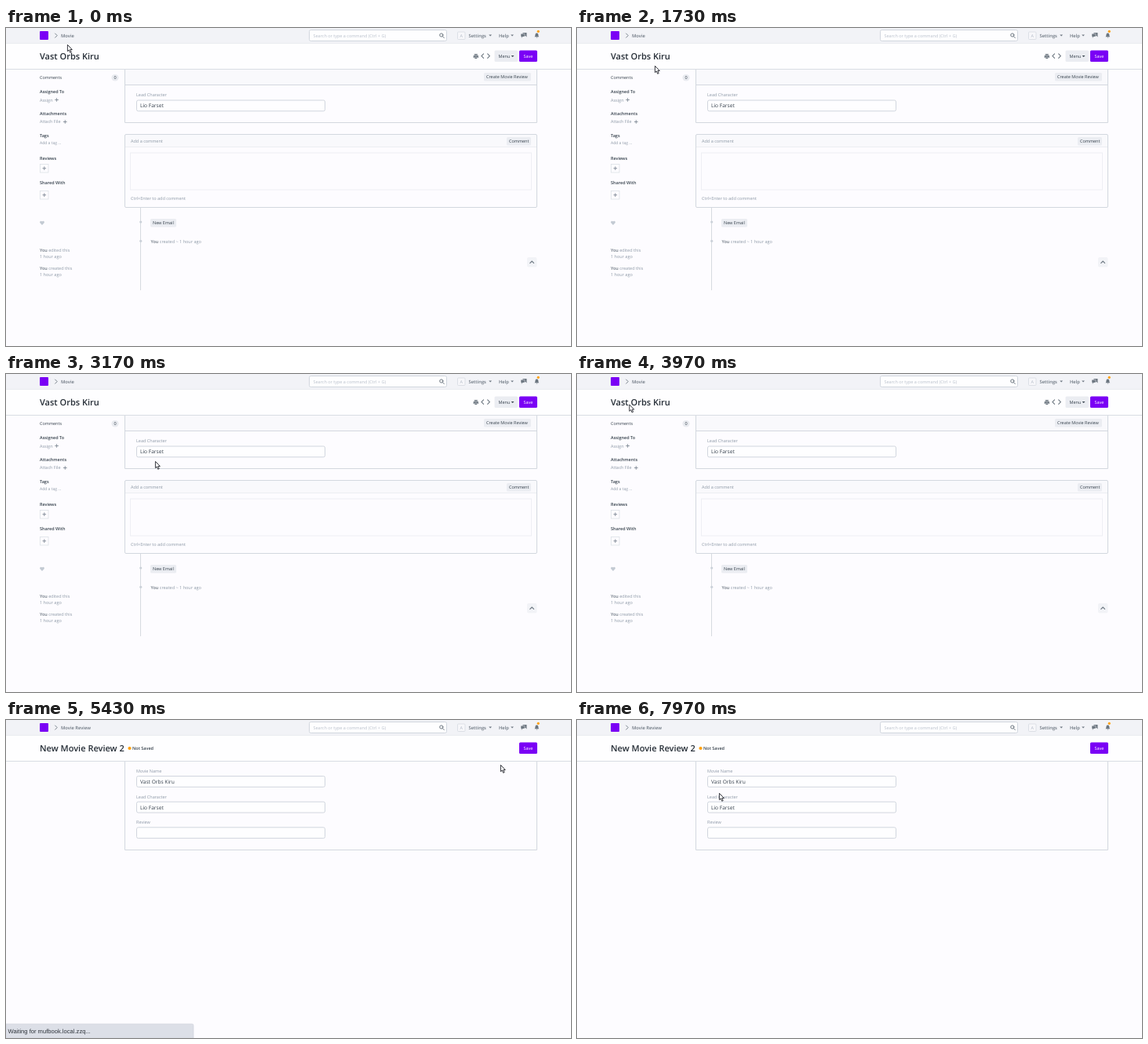
An HTML page for the animation above (8 s loop, 720 by 405 pixels).

```html
<!DOCTYPE html>
<html lang="en">
<head>
<meta charset="utf-8">
<title>Movie review form</title>
<style>
html, body { margin: 0; width: 100%; height: 100%; overflow: hidden; background: #fdfcff; }
svg { display: block; width: 720px; height: 405px; }
text { font: 5.5px "Open Sans", "Noto Sans", sans-serif; fill: #36414c; text-rendering: geometricPrecision; white-space: pre; }
.m { fill: #8d99a6; }
.b { font-weight: 600; }
.n { font-weight: 600; font-size: 5.8px; fill: #6c7680; }
.t { font-weight: 600; font-size: 11px; fill: #252d36; }
.v { font-size: 6.6px; }
.k { font-weight: 500; }
.btn { fill: #ebedf2; }
.box { fill: none; stroke: #d3d8df; }
.in { fill: #fefeff; stroke: #d1d6de; }
.ln { fill: none; stroke: #6c7680; stroke-linecap: round; stroke-linejoin: round; }
.ic { fill: #6c7680; }
</style>
</head>
<body>
<svg viewBox="0 0 720 405">
  <defs>
    <path id="plus" d="M-2.3 0h4.6M0-2.3v4.6" stroke="#7f8a96" stroke-width=".9"/>
    <path id="caret" d="M-1.9-1h3.8L0 1z"/>
    <rect id="field" class="in" x="166.5" width="240" height="13.8" rx="2"/>
    <rect id="add" x="43.5" width="10.5" height="10.5" fill="none" stroke="#dde1e7" stroke-width=".8"/>
  </defs>
  <rect width="720" height="405" fill="#fdfcff"/>

  <g id="record">
    <path fill="#f9f9fc" d="M152 52h524v20H152z"/>
    <path class="box" d="M151.5 52V120.5H676.5V52M152 72.5H676"/>
    <rect id="create" class="btn" x="609" y="57" width="60" height="10.5" rx="1.5"/>
    <text class="k" x="612" y="64.2">Create Movie Review</text>
    <text class="m" x="166" y="87">Lead Character</text>
    <use href="#field" y="92"/>
    <text class="v" x="171" y="101.2">Lio Farset</text>

    <path fill="#f9f9fc" d="M152 136h524v15H152z"/>
    <path stroke="#eceef2" d="M152 151.5H676"/>
    <rect class="box" x="151.5" y="135.5" width="525" height="93" rx="1.5"/>
    <text class="m" x="159" y="145.6">Add a comment</text>
    <rect class="btn" x="638" y="139" width="31" height="10.5" rx="1.5"/>
    <text class="k" x="641" y="146.1">Comment</text>
    <rect x="158.5" y="159" width="511" height="47" fill="none" stroke="#eeeff4"/>
    <text class="m" x="159" y="218.8">Ctrl+Enter to add comment</text>

    <path stroke="#d6dae0" d="M171.5 229V334"/>
    <circle cx="171.7" cy="247" r="1.6" fill="#cbd1d9"/>
    <circle cx="171.7" cy="271.3" r="1.6" fill="#cbd1d9"/>
    <rect class="btn" x="184" y="243" width="33" height="10.5" rx="1.5"/>
    <text class="k" x="187" y="250.4">New Email</text>
    <text class="m" x="184.5" y="273.7"><tspan class="b" fill="#6c7680">You</tspan> created ~ 1 hour ago</text>
    <rect x="664" y="292" width="12.5" height="12.5" rx="2" fill="#f2f3f7"/>
    <path class="ln" d="M667.8 299.4l2.4-2.4 2.4 2.4" stroke-width="1.1"/>

    <text x="43" y="65.2">Comments</text>
    <rect x="134.5" y="59" width="9" height="8.5" rx="4.2" fill="#e9ebf0"/>
    <text x="137.5" y="65.2">0</text>
    <text class="b" x="43" y="82.6">Assigned To</text>
    <text class="m" x="43" y="93.5">Assign</text>
    <text class="b" x="43" y="110.6">Attachments</text>
    <text class="m" x="43" y="121.3">Attach File</text>
    <text class="b" x="43" y="138.6">Tags</text>
    <text class="m" x="43" y="148.3" style="font-size:5px">Add a tag ...</text>
    <text class="b" x="43" y="167.7">Reviews</text>
    <text class="b" x="43" y="199.3">Shared With</text>
    <use href="#add" y="173.5"/>
    <use href="#add" y="207.5"/>
    <use href="#plus" x="64.6" y="91.5"/>
    <use href="#plus" x="75.3" y="119.5"/>
    <use href="#plus" x="48.8" y="178.7"/>
    <use href="#plus" x="48.8" y="212.7"/>
    <path fill="#c3cad3" d="M46 251l-2.6-2.7c-1.1-1.5.9-3.8 2.6-1.9 1.7-1.9 3.7.4 2.6 1.9z"/>
    <text class="m" x="43" y="284.7"><tspan class="b" fill="#6c7680">You</tspan> edited this</text>
    <text class="m" x="43" y="292.8">1 hour ago</text>
    <text class="m" x="43" y="307.7"><tspan class="b" fill="#6c7680">You</tspan> created this</text>
    <text class="m" x="43" y="315.7">1 hour ago</text>
  </g>

  <g id="review">
    <path class="box" d="M151.5 52V165.5H676.5V52"/>
    <text class="m" x="166" y="67">Movie Name</text>
    <text class="m" x="166" y="99.6">Lead Character</text>
    <text class="m" x="166" y="132.3">Review</text>
    <use href="#field" y="71.5"/>
    <use href="#field" y="104.2"/>
    <use href="#field" y="136.8"/>
    <text class="v" x="171" y="80.9">Vast Orbs Kiru</text>
    <text class="v" x="171" y="113.5">Lio Farset</text>
  </g>

  <path fill="#fefeff" d="M0 20h720v32H0z"/>
  <path stroke="#d9dde3" d="M0 52.5H720"/>
  <path fill="#f2f3f7" d="M0 0h720v20H0z"/>
  <path stroke="#eaecf0" d="M0 19.5H720"/>
  <rect x="43" y="4" width="11" height="11" rx="1" fill="#7a00f5"/>
  <path class="ln" d="M62.6 7l2.6 2.6-2.6 2.6" stroke-width=".9"/>
  <rect class="in" x="386.5" y="2.5" width="175" height="14" rx="2"/>
  <text x="391.5" y="11.6" style="fill:#b9c0ca">Search or type a command (Ctrl + G)</text>
  <g class="ln"><circle cx="554.8" cy="9" r="2.1"/><path d="M556.4 10.7l1.9 1.9"/></g>
  <rect x="575.5" y="5" width="9.5" height="9.5" rx="1" fill="#f7f7fa" stroke="#d6dae1" stroke-width=".8"/>
  <text x="578.5" y="11.9" style="fill:#b4bcc7">A</text>
  <text class="n" x="589.5" y="11.7">Settings</text>
  <text class="n" x="628" y="11.7">Help</text>
  <use class="ic" href="#caret" x="617.2" y="9.6"/>
  <use class="ic" href="#caret" x="645.1" y="9.6"/>
  <path class="ic" d="M658.5 6h5v5.5l-1.5-1.5h-3.5z"/>
  <path class="ic" stroke="#f2f3f7" stroke-width=".5" d="M656 7.3h5v3.8h-2.5l-1.7 1.8v-1.8h-.8z"/>
  <path class="ic" d="M673.5 11.3c1-1 .9-2 1-3 .2-2.3 3.6-2.3 3.8 0 .1 1 0 2 1 3zM675.6 11.7h1.8c-.2 1-1.6 1-1.8 0z"/>
  <circle cx="678.3" cy="4.3" r="1.6" fill="#ffa00a"/>

  <g id="recordHead">
    <text class="n" x="70" y="11.7">Movie</text>
    <text class="t" x="43" y="39.9">Vast Orbs Kiru</text>
    <path class="ic" d="M596.8 33h4v1.6h-4zM595.7 35h6.2v3h-1.1v-1.2h-4v1.2h-1.1zM597.3 37.3h3v1.8h-3z"/>
    <path class="ln" d="M608.6 32.9l-2.7 2.7 2.7 2.7M613.7 32.9l2.7 2.7-2.7 2.7" stroke-width="1.1"/>
    <rect class="btn" x="622.5" y="28.5" width="29.5" height="14.5" rx="1.5"/>
    <text class="k" x="627.5" y="37.9">Menu</text>
    <use href="#caret" x="645.6" y="36" fill="#36414c"/>
  </g>
  <g id="reviewHead">
    <text class="n" x="70" y="11.7">Movie Review</text>
    <text class="t" x="43" y="39.9">New Movie Review 2</text>
    <circle cx="157.5" cy="36" r="2.1" fill="#ffa00a"/>
    <text class="b" x="161" y="38">Not Saved</text>
  </g>
  <rect x="654" y="28.5" width="23" height="14.5" rx="1.5" fill="#7a00f5"/>
  <text class="k" x="659.5" y="37.9" style="fill:#fff">Save</text>

  <g id="status">
    <path fill="#dcdfe7" stroke="#d0d4dd" stroke-width=".6" d="M0 387h237q2 0 2 2v16H0z"/>
    <text x="2.5" y="398.7" style="font:7.6px 'Liberation Sans',Arial,sans-serif;fill:#30353c">Waiting for mufbook.local.zzq...</text>
  </g>

  <g id="cursor" fill="#fff" stroke="#20222a" stroke-width=".9" stroke-linejoin="round">
    <path id="arrow" d="M.4.3V8.7L2.3 7 3.7 10.3 5.2 9.6 3.8 6.5H6.3z"/>
    <path id="hand" d="M-.2.7Q.9-.7 1.6.7V3L4.7 3.5Q6 3.8 5.9 5L5.3 8.3H.5L-2.5 5.2Q-2.4 3.9-1.2 4.5L-.2 5.2z"/>
  </g>
</svg>
<script>
const LOOP = 8000, STEP = 1000 / 30;
// Pointer moves: start, end, then the points passed at even intervals
const moves = [
  [0, 33, "52,15"],
  [100, 133, "64,28"],
  [433, 900, "63,19 78,21"],
  [1100, 1733, "44,40 99,48"],
  [1767, 1933, "72,47"],
  [1933, 2467, "44,30 600,5 670,120 420,240 160,106"],
  [2667, 3166, "156,110 197,111 190,111"],
  [3533, 3800, "600,70 72,40"],
  [3933, 4533, "47,34 300,107 661,16 630,57"],
  [5967, 6733, "400,46 170,69"],
  [6767, 6800, "167,69"],
  [6800, 7633, "340,10 665,30 420,88 183,87"],
  [7633, 7666, "186,87"],
  [7900, 7966, "181,93"]
].map(([from, to, pts]) => ({ from, to, pts: pts.split(" ").map(p => p.split(",").map(Number)) }));
const el = id => document.getElementById(id);
const show = (id, on) => el(id).setAttribute("visibility", on ? "visible" : "hidden");
const clamp = v => Math.max(0, Math.min(1, v));

function tip(t) {
  let at = [78, 21];
  for (const { from, to, pts } of moves) {
    if (t <= from) break;
    const u = clamp((t - from) / (to - from)) * pts.length;
    const line = [at, ...pts];
    const i = Math.min(Math.floor(u), pts.length - 1);
    at = line[i].map((v, k) => v + (line[i + 1][k] - v) * (u - i));
  }
  return at;
}

function draw(now) {
  const t = Math.floor((now % LOOP + 4) / STEP) * STEP;
  const [x, y] = tip(t);
  const opened = t >= 5099;
  const over = !opened && x > 609 && x < 669 && y > 56 && y < 67.5;
  const pressed = over && t >= 4966 && t < 5060;
  for (const id of ["record", "recordHead"]) show(id, !opened);
  for (const id of ["review", "reviewHead"]) show(id, opened);
  el("create").style.fill = pressed ? "#bcc4d0" : over ? "#d0d5df" : "";
  show("hand", over);
  show("arrow", !over);
  el("cursor").setAttribute("transform", `translate(${x} ${y})`);
  el("status").setAttribute("opacity", clamp((t - 5233) / 167) * clamp((5766 - t) / 200));
}

const start = performance.now();
function tick() {
  draw(performance.now() - start);
  requestAnimationFrame(tick);
}
tick();
</script>
</body>
</html>
```
